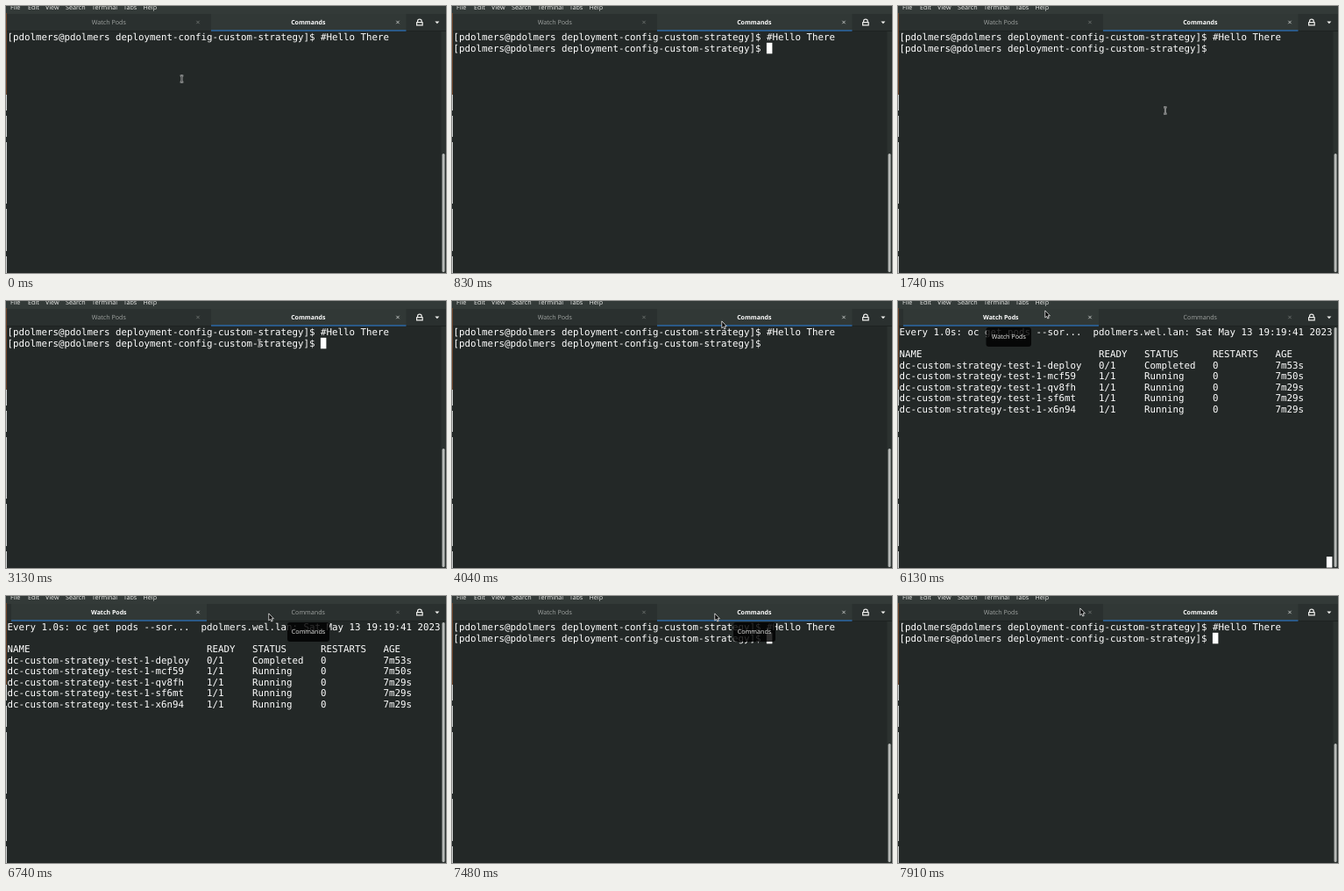
Write an HTML page that moves like this. It is 502x304 px and loops after 8000 ms.

```html
<!DOCTYPE html>
<html lang="en">
<head>
<meta charset="utf-8">
<title>Terminal tabs</title>
<style>
  html, body { margin: 0; width: 100%; height: 100%; overflow: hidden; background: #232827; }
  svg { display: block; width: 502px; height: 304px; }
  text { white-space: pre; text-rendering: geometricPrecision; }
  .mono { font: 10.8px "DejaVu Sans Mono", monospace; fill: #fff; }
  .ui { font: 7.2px "Open Sans", "Noto Sans", sans-serif; fill: #eeeeec; }
  .mid { text-anchor: middle; }
</style>
</head>
<body>
<svg id="stage" viewBox="0 0 502 304" xmlns="http://www.w3.org/2000/svg"></svg>
<script>
const LOOP = 8000;
const CELL = 6.5, ROW = 12.5, LEFT = 1.6, BASELINE = 39.3;
const USER = 'pdolmers';
const PROMPT = `[${USER}@${USER} deployment-config-custom-strategy]$ `;

const stage = document.getElementById('stage');

function add(parent, tag, attrs, content) {
  const node = document.createElementNS('http://www.w3.org/2000/svg', tag);
  set(node, attrs);
  if (content !== undefined) node.textContent = content;
  parent.appendChild(node);
  return node;
}
function set(node, attrs) {
  for (const key in attrs) node.setAttribute(key, attrs[key]);
}
function show(node, visible) {
  node.setAttribute('visibility', visible ? 'visible' : 'hidden');
}
const rect = (parent, x, y, width, height, fill, more) =>
  add(parent, 'rect', { x, y, width, height, fill, ...more });
const group = () => add(stage, 'g', {});
const line = (parent, row, content = '') =>
  add(parent, 'text', { class: 'mono', x: LEFT, y: BASELINE + row * ROW }, content);

// Window chrome
rect(stage, 0, 0, 502, 304, '#232827');
rect(stage, 0, 0, 502, 9, '#333a38');
rect(stage, 0, 9, 502, 20, '#2a302f');
rect(stage, 0, 28.2, 502, 0.8, '#1c201f');
rect(stage, 496.5, 29, 5.5, 275, '#2c3230');
rect(stage, 0, 8, 1, 93, '#70452a');
rect(stage, 0, 101, 1, 203, '#d0d2d1');
for (const y of [119, 149, 225, 279]) rect(stage, 0, y, 1, 6, '#252a29');

const menu = { File: 5, Edit: 25, View: 45, Search: 68, Terminal: 98, Tabs: 134, Help: 156.5 };
for (const label in menu) {
  add(stage, 'text', { class: 'ui', x: menu[label], y: 4.2 }, label);
}

function makeTab(label, x, width, labelX, closeX) {
  const back = rect(stage, x, 9, width, 19.2, '#313836');
  const accent = rect(stage, x, 27.3, width, 1.4, '#2c6cae');
  const title = add(stage, 'text', { class: 'ui mid', x: labelX, y: 20.8 }, label);
  const close = add(stage, 'path', {
    d: `M${closeX - 1.7} 16.8l3.4 3.4m0 -3.4l-3.4 3.4`, 'stroke-width': 0.9, fill: 'none'
  });
  return active => {
    show(back, active);
    show(accent, active);
    title.style.fontWeight = active ? 700 : 400;
    title.style.fontSize = active ? '7px' : '7.2px';
    title.style.fill = active ? '#fff' : '#9fa3a1';
    set(close, { stroke: active ? '#c5c8c7' : '#6c716f' });
  };
}
const setWatchTab = makeTab('Watch Pods', 6, 223, 117.3, 219);
const setCommandsTab = makeTab('Commands', 234, 222.5, 344.8, 447);

add(stage, 'path', {
  d: 'M469.6 18.4v-1.2q0 -2 2.3 -2t2.3 2v1.2M468.3 18.6h7.2M468.6 18.6v3.2h6.6v-3.2',
  fill: 'none', stroke: '#eeeeec', 'stroke-width': 1.2
});
add(stage, 'path', { d: 'M489.4 17.4h5l-2.5 2.8z', fill: '#eeeeec' });
const thumb = rect(stage, 497.6, 168, 3, 135, '#b6b9b7', { rx: 1.5 });

// Terminal contents
const shell = group();
line(shell, 0, PROMPT + '#Hello There');
const secondPrompt = line(shell, 1, PROMPT);

const watch = group();
const header = line(watch, 0);
const tableRow = (name, ready, status, restarts, age) =>
  name.padEnd(35) + ready.padEnd(8) + status.padEnd(12) + restarts.padEnd(11) + age;
line(watch, 2, tableRow('NAME', 'READY', 'STATUS', 'RESTARTS', 'AGE'));
const pods = [
  { id: 'deploy', seconds: 0 },
  { id: 'mcf59', seconds: -3 },
  { id: 'qv8fh', seconds: -24 },
  { id: 'sf6mt', seconds: -24 },
  { id: 'x6n94', seconds: -24 }
];
pods.forEach((pod, i) => { pod.node = line(watch, 3 + i); });

function updateWatch(clock, age) {
  header.textContent =
    `Every 1.0s: oc get pods --sor...  ${USER}.wel.lan: Sat May 13 19:19:${clock} 2023`;
  for (const { id, seconds, node } of pods) {
    const isDeploy = id === 'deploy';
    node.textContent = tableRow('dc-custom-strategy-test-1-' + id, isDeploy ? '0/1' : '1/1',
      isDeploy ? 'Completed' : 'Running', '0', `7m${age + seconds}s`);
  }
}

const caret = rect(stage, 0, 0, 6.5, 12.5, '#fff');

function makeTooltip(label, x, width) {
  const tip = group();
  rect(tip, x, 30, width, 22, '#000', { rx: 3, 'fill-opacity': 0.82 });
  add(tip, 'text', { class: 'ui mid', x: x + width / 2, y: 43.4 }, label);
  return tip;
}
const watchTip = makeTooltip('Watch Pods', 100.5, 51.5);
const commandsTip = makeTooltip('Commands', 321, 48);

// Pointers, drawn around their hot spots
const beam = group();
const beamPath = 'M-1.8 -3.7h1.1l0.7 0.5l0.7 -0.5h1.1M0 -3.2v6.4M-1.8 3.7h1.1l0.7 -0.5l0.7 0.5h1.1';
add(beam, 'path', { d: beamPath, fill: 'none', stroke: '#d8dada', 'stroke-width': 1.7 });
add(beam, 'path', { d: beamPath, fill: 'none', stroke: '#111', 'stroke-width': 0.6 });
const arrow = add(stage, 'path', {
  d: 'M-0.2 -0.1v8l1.8 -1.6l1.2 2.7l1.4 -0.6l-1.2 -2.6h2.4z',
  fill: '#000', stroke: '#f2f2f2', 'stroke-width': 0.8, 'stroke-linejoin': 'round'
});

// Pointer stops: time, x, y
const path = [
  [0, 200.5, 83], [1480, 200.5, 83], [1740, 304.8, 119], [1900, 302, 112], [2300, 289, 48],
  [3350, 289, 48], [3390, 286.5, 44], [3550, 286.5, 44], [4040, 308, 23], [4300, 304, 18],
  [4420, 304, 18], [4780, 168, 11], [6150, 168, 11], [6560, 300, 20], [7600, 300, 20],
  [7890, 208, 14], [LOOP, 208, 14]
];
function pointerAt(t) {
  const i = path.findIndex(stop => stop[0] > t);
  const [t0, x0, y0] = path[i - 1], [t1, x1, y1] = path[i];
  const u = (t - t0) / (t1 - t0), k = u * u * (3 - 2 * u);
  return [x0 + (x1 - x0) * k, y0 + (y1 - y0) * k];
}

const between = (t, from, to) => t >= from && t < to;
const blink = (t, start) => Math.floor((t - start) / 607) % 2 === 0;

// Column, row and visibility of the text caret
function caretAt(t, watching) {
  if (watching) return [75, 20.5, blink(t, 4825)];
  if (t < 700) return [67, 0, t >= 130];
  return [55, 1, blink(t, t >= 7480 ? 7480 : 693)];
}

function render(t) {
  const watching = between(t, 4825, 7480);
  setWatchTab(watching);
  setCommandsTab(!watching);
  show(shell, !watching);
  show(watch, watching);
  show(secondPrompt, !watching && t >= 700);
  set(thumb, watching ? { y: 30, height: 273 } : { y: 168, height: 135 });

  if (t < 5830) updateWatch(40, 51);
  else if (t < 7130) updateWatch(41, 53);
  else updateWatch(42, 54);

  const [column, row, lit] = caretAt(t, watching);
  set(caret, { x: LEFT + column * CELL - 0.2, y: 29.3 + row * ROW + (watching ? 5.5 : 0) });
  show(caret, lit);

  show(watchTip, between(t, 5480, 6240));
  show(commandsTip, between(t, 6740, 7650));

  const [x, y] = pointerAt(t);
  const overText = y > 29;
  const transform = `translate(${x} ${y})`;
  set(beam, { transform });
  set(arrow, { transform });
  show(beam, overText && !between(t, 650, 1520));
  show(arrow, !overText);
}

const start = performance.now();
function tick() {
  render((performance.now() - start) % LOOP);
  requestAnimationFrame(tick);
}
tick();
</script>
</body>
</html>
```
